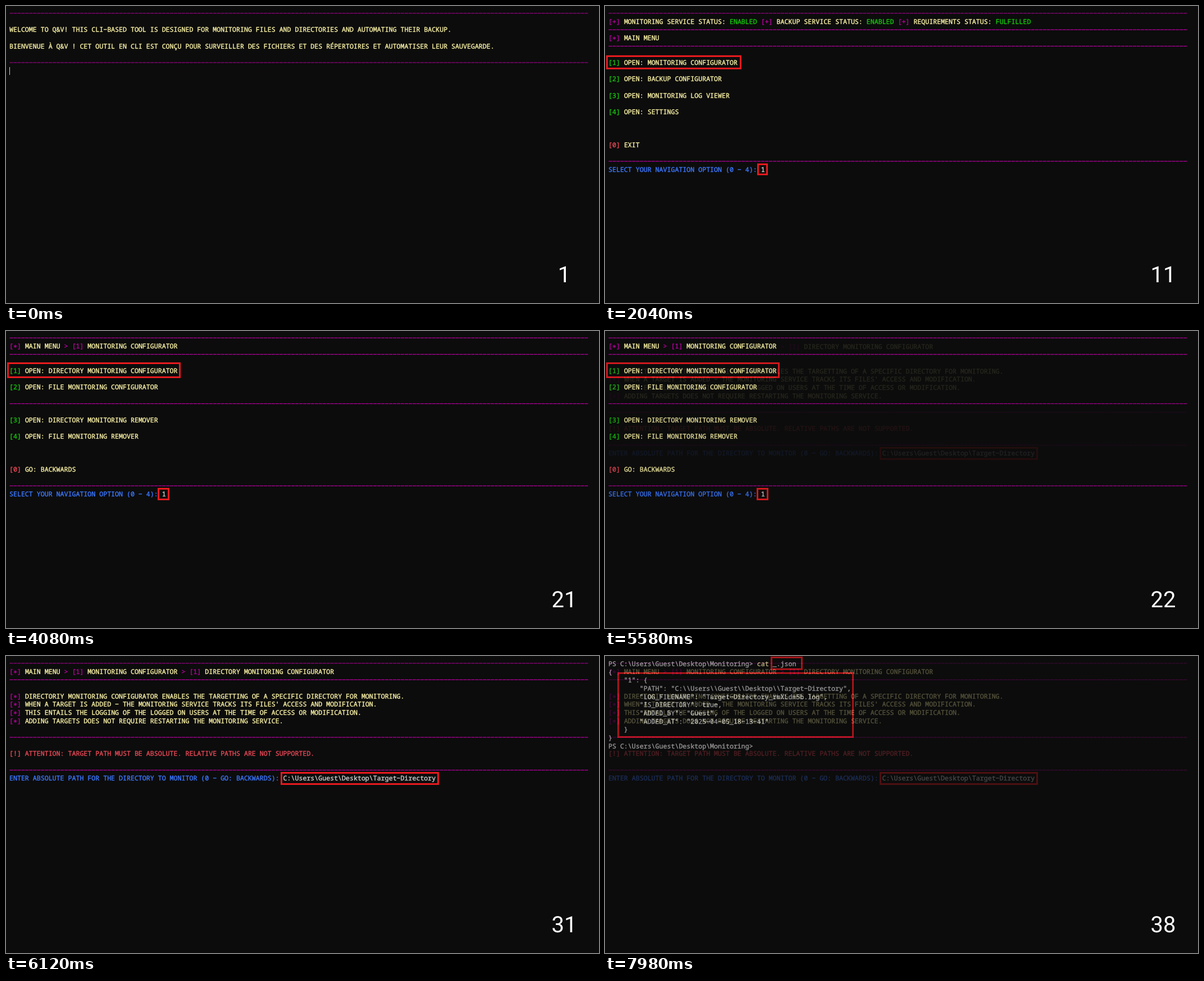
Recreate the animation shown at these times as an HTML page. Size 1056 by 530 pixels, loop 8 s.

```html
<!DOCTYPE html>
<html lang="en">
<head>
<meta charset="utf-8">
<title>Terminal walkthrough</title>
<style>
  html, body { margin: 0; width: 100%; height: 100%; overflow: hidden; background: #0c0c0c; }
  svg { display: block; width: 100%; height: 100%; }
  text { white-space: pre; text-rendering: geometricPrecision; }
  .screen text { font: 500 11.612px "Noto Sans Mono", "DejaVu Sans Mono", monospace; font-variant-ligatures: none; }
  tspan { fill: currentColor; stroke: currentColor; stroke-width: .4; }
  .rule { stroke: #b4009e; stroke-width: 1.2; stroke-dasharray: 6.2 .765; }
  .box { fill: none; stroke: #e81a1e; stroke-width: 3; }
  #counter { font: 40px Roboto, "Liberation Sans", sans-serif; fill: #fff; text-anchor: middle; }
</style>
</head>
<body>
<svg viewBox="0 0 1056 530">
  <g id="screens"></g>
  <text id="counter" x="994" y="493"></text>
</svg>
<script>
const LEFT = 6, COLUMN = 6.967, ROW = 14.67, COLUMNS = 148;
const HOLD = 1500, STEP = 60, FADE_STEPS = 10, LOOP = 8000;
const PERIOD = HOLD + (FADE_STEPS - 1) * STEP;
const COLORS = { p: '#b4009e', y: '#f9f1a5', g: '#16c60c', r: '#e74856', b: '#3b78ff', w: '#cccccc' };

// One line per terminal row; "---" is a full-width rule, "~x" switches colour.
const screens = [
  { top: 13, boxes: [], cursorRow: 7, rows: String.raw`
---

~yWELCOME TO Q&amp;V! THIS CLI-BASED TOOL IS DESIGNED FOR MONITORING FILES AND DIRECTORIES AND AUTOMATING THEIR BACKUP.

~yBIENVENUE À Q&amp;V ! CET OUTIL EN CLI EST CONÇU POUR SURVEILLER DES FICHIERS ET DES RÉPERTOIRES ET AUTOMATISER LEUR SAUVEGARDE.

---` },
  { top: 13, boxes: [[2, 88, 243, 113], [271, 281, 290, 302]], rows: String.raw`
---
~p[+] ~yMONITORING SERVICE STATUS: ~gENABLED ~p[+] ~yBACKUP SERVICE STATUS: ~gENABLED ~p[+] ~yREQUIREMENTS STATUS: ~gFULFILLED
---
~p[*] ~yMAIN MENU
---

~g[1] ~yOPEN: MONITORING CONFIGURATOR

~g[2] ~yOPEN: BACKUP CONFIGURATOR

~g[3] ~yOPEN: MONITORING LOG VIEWER

~g[4] ~yOPEN: SETTINGS



~r[0] ~yEXIT

---
~bSELECT YOUR NAVIGATION OPTION (0 - 4): ~w1` },
  { top: 12.3, boxes: [[2, 56, 311, 84], [270, 280, 291, 302]], rows: String.raw`
---
~p[*] ~yMAIN MENU ~p&gt; [1] ~yMONITORING CONFIGURATOR
---

~g[1] ~yOPEN: DIRECTORY MONITORING CONFIGURATOR

~g[2] ~yOPEN: FILE MONITORING CONFIGURATOR

---

~g[3] ~yOPEN: DIRECTORY MONITORING REMOVER

~g[4] ~yOPEN: FILE MONITORING REMOVER



~r[0] ~yGO: BACKWARDS

---
~bSELECT YOUR NAVIGATION OPTION (0 - 4): ~w1` },
  { top: 13, boxes: [[489, 207, 771, 230]], rows: String.raw`
---
~p[*] ~yMAIN MENU ~p&gt; [1] ~yMONITORING CONFIGURATOR ~p&gt; [1] ~yDIRECTORY MONITORING CONFIGURATOR
---

~p[*] ~yDIRECTORIY MONITORING CONFIGURATOR ENABLES THE TARGETTING OF A SPECIFIC DIRECTORY FOR MONITORING.
~p[*] ~yWHEN A TARGET IS ADDED - THE MONITORING SERVICE TRACKS ITS FILES' ACCESS AND MODIFICATION.
~p[*] ~yTHIS ENTAILS THE LOGGING OF THE LOGGED ON USERS AT THE TIME OF ACCESS OR MODIFICATION.
~p[*] ~yADDING TARGETS DOES NOT REQUIRE RESTARTING THE MONITORING SERVICE.

---

~r[!] ATTENTION: TARGET PATH MUST BE ABSOLUTE. RELATIVE PATHS ARE NOT SUPPORTED.

---
~bENTER ABSOLUTE PATH FOR THE DIRECTORY TO MONITOR (0 - GO: BACKWARDS): ~wC:\Users\Guest\Desktop\Target-Directory` },
  { top: 13.9, boxes: [[295, 1, 352, 25], [22, 29, 443, 146]], rows: String.raw`
~wPS C:\Users\Guest\Desktop\Monitoring&gt; ~ycat ~w_.json
~w{
~w    "1": {
~w        "PATH": "C:\\Users\\Guest\\Desktop\\Target-Directory",
~w        "LOG_FILENAME": "Target-Directory_rmXLdm5b.log",
~w        "IS_DIRECTORY": true,
~w        "ADDED_BY": "Guest",
~w        "ADDED_AT": "2025-04-05_18-13-41"
~w    }
~w}
~wPS C:\Users\Guest\Desktop\Monitoring&gt;` }
];

function drawRow(row, y) {
  if (!row) return '';
  if (row === '---') return `<path class="rule" d="M${LEFT + .4} ${y}h${COLUMNS * COLUMN - .8}"/>`;
  // The math signs have the wide hyphen and centred star of a terminal font.
  const spans = row.replace(/-/g, '\u2212').replace(/\*/g, '\u2217').replace(/~(.)([^~]*)/g,
    (_, color, text) => `<tspan color="${COLORS[color]}">${text}</tspan>`);
  return `<text x="${LEFT}" y="${y + 4.1}">${spans}</text>`;
}

function drawBox([left, top, right, bottom]) {
  return `<rect class="box" x="${left + 1.5}" y="${top + 1.5}" width="${right - left - 3}" height="${bottom - top - 3}"/>`;
}

function drawScreen({ top, boxes, cursorRow, rows }) {
  const lines = rows.slice(1).split('\n').map((row, i) => drawRow(row, top + i * ROW));
  const cursor = cursorRow
    ? `<rect x="6" y="${Math.round(top + cursorRow * ROW) - 7}" width="1" height="14" fill="#ccc"/>` : '';
  return `<g class="screen"><rect width="1056" height="530" fill="#0c0c0c"/>${lines.join('')}${cursor}${boxes.map(drawBox).join('')}</g>`;
}

const stage = document.getElementById('screens');
const counter = document.getElementById('counter');
stage.innerHTML = screens.map(drawScreen).join('');
const layers = [...stage.children];

function render(time) {
  const t = time % LOOP;
  const current = Math.floor(t / PERIOD);
  const step = Math.max(0, Math.floor((t % PERIOD - HOLD) / STEP) + 1);
  layers.forEach((layer, i) => {
    const opacity = i === current ? 1 : i === current + 1 ? step / FADE_STEPS : 0;
    layer.style.display = opacity ? '' : 'none';
    layer.style.opacity = opacity;
  });
  counter.textContent = current * FADE_STEPS + step + 1;
}

const start = performance.now();
function tick() {
  render(performance.now() - start);
  requestAnimationFrame(tick);
}
tick();
</script>
</body>
</html>
```
